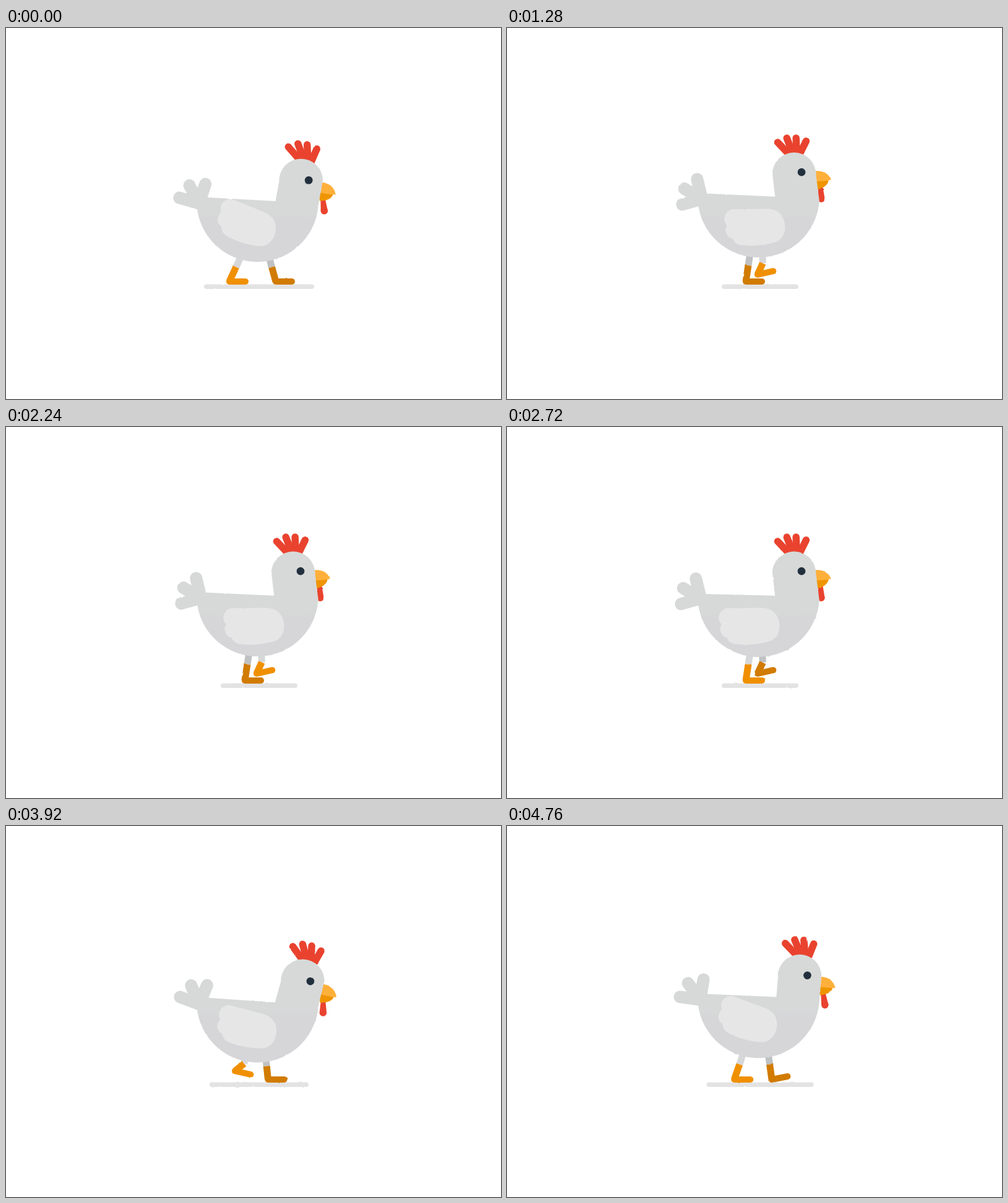
Recreate the animation shown at these times as an HTML page with a canvas. Size 800 by 600 pixels, loop 4.8 s.

```html
<!DOCTYPE html>
<html lang="en">
<head>
<meta charset="utf-8">
<title>Walking hen</title>
<style>
  html, body { margin: 0; width: 100%; height: 100%; overflow: hidden; background: #fff; }
  canvas { position: absolute; left: 250px; top: 150px; filter: url(#rough); }
  svg { position: absolute; }
</style>
</head>
<body>
<svg width="0" height="0">
  <filter id="rough" x="0" y="0" width="1" height="1" color-interpolation-filters="sRGB">
    <feTurbulence id="noise" type="fractalNoise" baseFrequency="0.13" numOctaves="1" seed="1"/>
    <feDisplacementMap in="SourceGraphic" scale="2.2" xChannelSelector="R" yChannelSelector="G"/>
  </filter>
</svg>
<canvas id="c" width="310" height="290"></canvas>
<script>
const ctx = document.getElementById('c').getContext('2d');
const noise = document.getElementById('noise');
const STEP = 40, CYCLE = 24, GROUND = 410;
const RED = '#e9432f', BEAK = '#ffb03b', BEAK_LOW = '#ef9500';
const { sin, cos, PI } = Math;
const RAD = PI / 180;

let k = 0;
// One wave per footstep, and a slower sway per full stride
const wave = (mid, a, b) => mid + a * cos(k * 30 * RAD) + b * sin(k * 30 * RAD);
const sway = amp => amp * cos(k * 15 * RAD);
const polar = (x, y, r, deg) => [x + r * cos(deg * RAD), y + r * sin(deg * RAD)];

function line(color, width, cap, ...pts) {
  ctx.strokeStyle = color;
  ctx.lineWidth = width;
  ctx.lineCap = cap;
  ctx.lineJoin = 'round';
  ctx.beginPath();
  for (let i = 0; i < pts.length; i += 2) ctx.lineTo(pts[i], pts[i + 1]);
  ctx.stroke();
}

function shape(color, d) {
  ctx.fillStyle = color;
  ctx.fill(new Path2D(d));
}

function dot(color, x, y, r) {
  ctx.fillStyle = color;
  ctx.beginPath();
  ctx.arc(x, y, r, 0, 7);
  ctx.fill();
}

function placed(x, y, deg, draw) {
  ctx.save();
  ctx.translate(x, y);
  ctx.rotate(deg * RAD);
  draw();
  ctx.restore();
}

// The foot swings forward in the first half of s, then slides back on the ground
function leg(s, hipY, thigh, color) {
  const u = s / 12, swing = u < 1;
  const lift = swing ? 18 * sin(PI * Math.min(1, u / 0.917) ** 0.75) : 0;
  const angle = swing ? 19 * sin(2 * PI * u ** 1.2) : 0;
  const x = swing ? 361 + 75 * u - 7 * sin(PI * u) : 436 - 75 * (u - 1);
  const y = GROUND - lift;
  const hipX = 404 - 16 * cos(s * 15 * RAD);
  const kneeX = x + 0.4 * (hipX - x) + lift * 0.5;
  const kneeY = y + 0.4 * (hipY - y) + lift * 0.3;
  line(thigh, 11, 'butt', hipX, hipY, kneeX, kneeY);
  line(color, 11, 'butt', kneeX, kneeY, x, y);
  line(color, 10, 'round', x, y, ...polar(x, y, 26, angle));
}

function tail(cy, color) {
  const x = 314 - sway(2), y = cy + 4, turn = wave(-13.5, 13.5, 13);
  for (let i = 0; i < 3; i++) {
    line(color, 20, 'round', ...polar(x, y, 33, 196 + 46 * i + turn), x, y);
  }
}

function body(hx, hy, cy, fill) {
  ctx.fillStyle = fill;
  ctx.beginPath();
  ctx.moveTo(308, wave(271.3, -1, 4) + sway(2.7));
  ctx.lineTo(wave(434, 1.5, 0), wave(279, 1, 6.5));
  ctx.lineTo(hx - 35, hy);
  ctx.arc(hx, hy, 35.3, PI, 0);
  ctx.arc(406.5, cy, 98.5, 0.07, PI);
  ctx.fill();
}

// Finger tips turn less than the head they stand on
function comb(lag) {
  const fingers = [-110.5, -94.7, -80.2, -63.4].map((deg, i) => {
    const base = [2 + 4.7 * i, -29];
    const tip = polar(0, 0, 60 - Math.abs(i - 1.2) * 1.6, deg + lag);
    const mid = tip.map((v, j) => (v + base[j]) / 2);
    line(RED, 11.5, 'round', ...tip, ...base);
    return { base, mid };
  });
  const a = fingers[0], b = fingers[3];
  shape(RED, `M${a.base}L${a.mid}L${b.mid}L${b.base}Z`);
}

function wattle(x, y) {
  const tx = x + wave(0.25, 1.7, -1.8), ty = y + 14;
  shape(RED, `M${x - 4} ${y - 5}L${x + 3.5} ${y - 5}L${tx + 5.7} ${ty}L${tx - 5.7} ${ty}Z`);
  dot(RED, tx, ty, 5.8);
}

function draw() {
  const hx = wave(471.7, 5, 6), hy = wave(243.7, 3, 6.5);
  const face = wave(-5.2, 5, 7);
  const cy = wave(278.2, 0.7, 5.6) + sway(0.8);
  const fill = ctx.createLinearGradient(0, 298, 0, 308);
  fill.addColorStop(0, '#d7d9d8');
  fill.addColorStop(1, '#d6d6d9');

  const half = wave(67.2, 18, 0);
  line('#e3e3e3', 7.5, 'round', 409 - half, 418.2, 409 + half, 418.2);
  leg((k + 12) % CYCLE, cy + 72, '#bfc1c2', '#d17b00');
  leg(k, cy + 72, '#d6d7d9', '#f09000');

  placed(hx, hy, face, () => comb(wave(4.2, -4, -1)));
  wattle(...polar(hx, hy, 50, 44.6 + face));
  placed(hx, hy, face, () => {
    shape(BEAK_LOW, 'M28 18L52 21C51 28 44 33 30 33Z');
    shape(BEAK, 'M30 3C44 3 54 10 56 23Q44 23 28 19Z');
  });

  tail(cy, fill);
  body(hx, hy, cy, fill);
  placed(417 - sway(9), wave(326.5, -1.5, 7), wave(-15, 15, 0), () =>
    shape('#e6e6e6', 'M-42-48L12-26C24-20 29-10 28 0C27 18 14 29 2 28' +
      'C-20 26-38 18-48 13C-56 9-60 4-60-4C-68-8-68-21-60-27C-64-38-56-50-42-48Z'));
  placed(hx, hy, face, () => dot('#22303e', 12.5, -0.5, 6.4));
}

let last = -1;
const start = performance.now();
function tick(now) {
  k = Math.floor(Math.max(0, now - start) / STEP) % CYCLE;
  if (k !== last) {
    last = k;
    noise.setAttribute('seed', k + 1);
    ctx.setTransform(1, 0, 0, 1, 0, 0);
    ctx.clearRect(0, 0, 310, 290);
    ctx.translate(-250, -150);
    draw();
  }
  requestAnimationFrame(tick);
}
tick(start);
</script>
</body>
</html>
```
